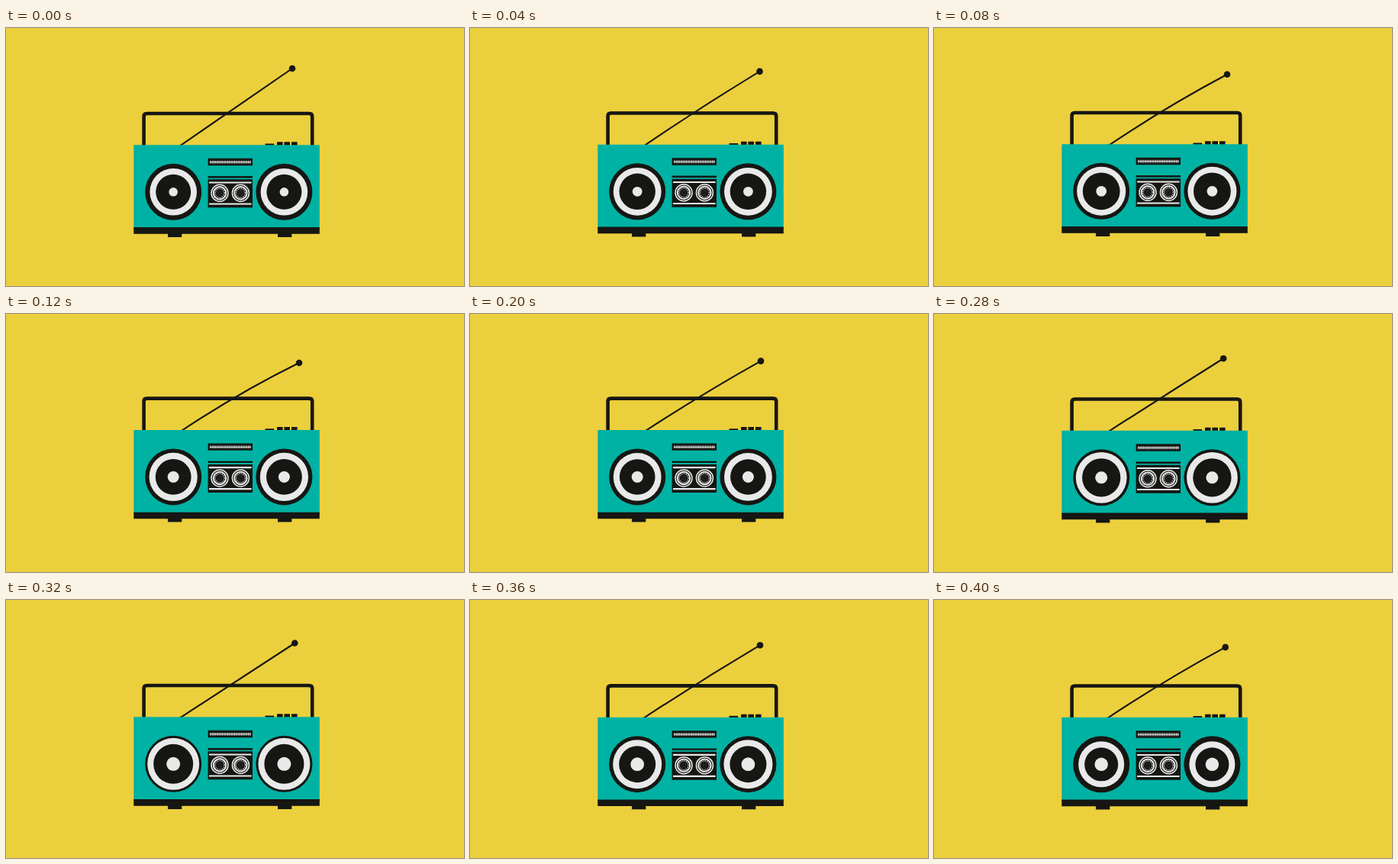
Animation, 600 px wide and 338 px high, one loop 0.48 s. Source, as an HTML page:

```html
<!DOCTYPE html>
<html lang="en">
<head>
<meta charset="utf-8">
<title>Boombox</title>
<style>
  html, body { margin: 0; width: 100%; height: 100%; overflow: hidden; background: #eccf3d; }
  svg { display: block; width: 600px; height: 338px; }
  .dark { fill: #161613; }
  .light { fill: #e9e9e9; }
  .line { fill: none; stroke: #161613; }
  .pale { fill: none; stroke: #e9e9e9; }
</style>
</head>
<body>
<svg viewBox="0 0 600 338">
  <defs>
    <g id="speaker">
      <circle class="dark" r="37"/>
      <circle class="light" id="ring"/>
      <circle class="dark" id="cone"/>
      <circle class="light" id="cap"/>
    </g>
    <g id="reel">
      <circle class="dark" r="12.5"/>
      <circle class="pale" r="11" stroke-width="1.5"/>
      <circle class="pale" r="8.2" stroke-width="2"/>
      <circle class="pale" r="6" stroke-width="1.6" stroke-dasharray="1 1.356"/>
      <circle class="pale" r="2.5" stroke-width="1" stroke-dasharray=".6 1.36" opacity=".4"/>
    </g>
  </defs>
  <path class="line" id="antenna" stroke-width="2.1"/>
  <circle class="dark" id="tip" r="4.3"/>
  <g id="radio">
    <path class="line" stroke-width="4.6" d="M180.6 154V115.5q0-4 4-4H397.2q4 0 4 4V154"/>
    <path class="dark" d="M339.5 151h11.7v3h-11.7zM355 148.8h7.6v5H355zM364.4 148.8h7.6v5h-7.6zM374 148.8h7.6v5H374z"/>
    <path class="dark" d="M212 268h18.3v5.4H212zM356 268h18.3v5.4H356z"/>
    <path fill="#00b2a3" d="M167.3 152.8h243.5v110H167.3z"/>
    <path class="dark" d="M167.3 260.6h243.5v8.6H167.3z"/>
    <path class="dark" d="M264.6 170.3h58.4v9.4h-58.4zM264.6 193.6h58.4v2.3h-58.4zM264.6 197.8h58.4v37h-58.4z"/>
    <path class="pale" stroke-width="1" d="M266.8 175.2h54.4"/>
    <path class="pale" stroke-width="4" stroke-dasharray=".9 1.35" d="M267.5 175.2h53"/>
    <path class="pale" stroke-width="2.2" d="M266 202h55.6M266 230h55.6"/>
    <use href="#reel" x="280" y="215.8"/>
    <use href="#reel" x="307.4" y="215.8"/>
    <use href="#speaker" x="219.2" y="214.3"/>
    <use href="#speaker" x="364.4" y="214.3"/>
  </g>
</svg>
<script>
  const LOOP = 480, STEP = 40, LAST = 400;
  // time, tip x, tip y, antenna bend, ring radius, cone radius, cap radius
  const poses = [
    [0, 375, 53, 0, 30.8, 23, 5.8],
    [80, 384, 60.8, 2.8, 32, 24.4, 6.9],
    [120, 384, 64, 3.5, 31.6, 23.4, 7.5],
    [200, 381, 61.6, 1.8, 31.4, 23.3, 7.5],
    [240, 380, 60, .6, 32.8, 24.3, 7],
    [320, 378.3, 56.5, 0, 34, 26, 9],
    [400, 381.7, 61.9, 2.4, 30, 22, 8.7]
  ];
  const base = { x: 226.5, y: 155.3 };
  const byId = id => document.getElementById(id);
  const set = (id, attrs) => {
    for (const key in attrs) byId(id).setAttribute(key, attrs[key]);
  };

  function poseAt(t) {
    const i = Math.max(1, poses.findIndex(p => p[0] >= t));
    const a = poses[i - 1], b = poses[i];
    const k = (t - a[0]) / (b[0] - a[0]);
    return a.map((v, n) => v + (b[n] - v) * k);
  }

  function draw(now) {
    const t = Math.min(LAST, Math.floor(now % LOOP / STEP) * STEP);
    const [, x, y, bend, ring, cone, cap] = poseAt(t);
    const bob = -Math.cos((t - 160) / LOOP * 2 * Math.PI);
    const midX = (base.x + x) / 2, midY = (base.y + y) / 2 - 2 * bend;
    set('antenna', { d: `M${base.x} ${base.y}Q${midX} ${midY} ${x} ${y}` });
    set('tip', { cx: x, cy: y });
    set('radio', { transform: `translate(0 ${bob})` });
    set('ring', { r: ring });
    set('cone', { r: cone });
    set('cap', { r: cap });
  }

  function tick() {
    draw(performance.now());
    requestAnimationFrame(tick);
  }
  tick();
</script>
</body>
</html>
```
